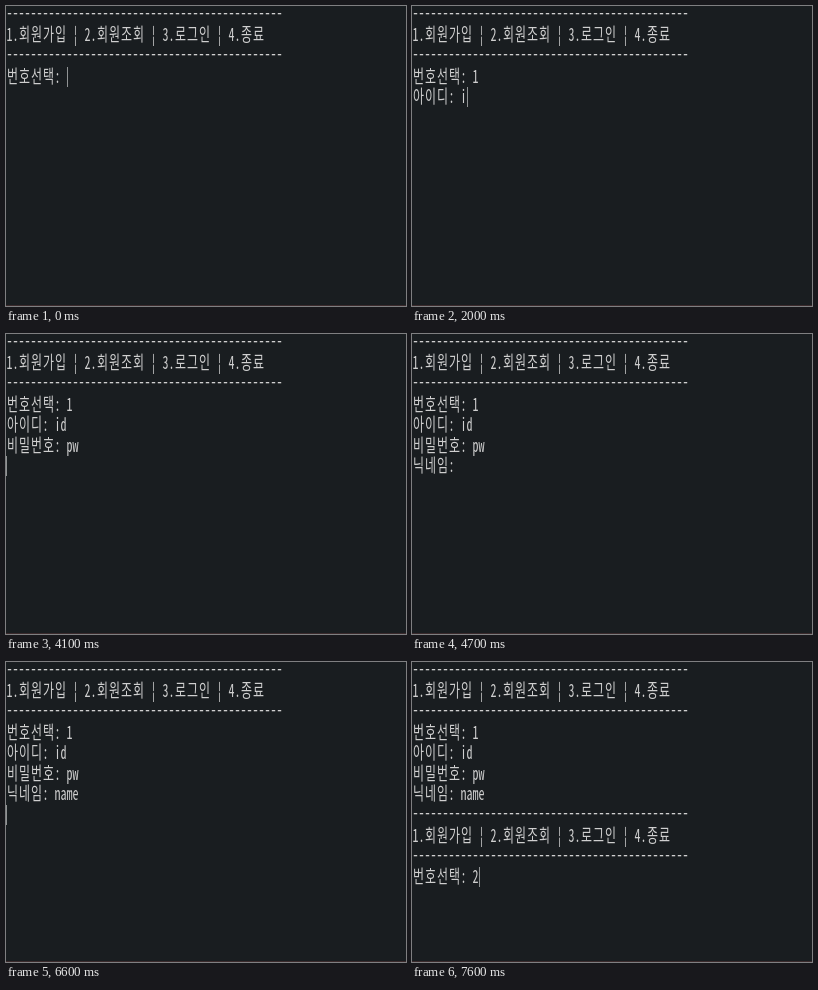
Write an HTML page with a canvas that moves like this. It is 400 by 300 pixels and loops after 8000 ms.

```html
<!DOCTYPE html>
<html lang="ko">
<head>
<meta charset="utf-8">
<style>
html, body { margin: 0; width: 100%; height: 100%; overflow: hidden; background: #191d20; }
canvas { display: block; }
</style>
</head>
<body>
<canvas id="stage" width="400" height="300"></canvas>
<script>
const ctx = document.getElementById('stage').getContext('2d');
const LOOP = 8000;
const CELL = 6, PITCH = 20.6, TOP = -1.3, BASE = 16;
const SIZE = 18, SQUEEZE = 2 * CELL / SIZE;
const FONT = SIZE + 'px "Noto Sans Mono CJK KR", "Noto Sans CJK KR", "Noto Sans CJK", "Noto Sans Mono", monospace';

const RULE = '-'.repeat(46);
const MENU = [RULE, '1.회원가입 ¦ 2.회원조회 ¦ 3.로그인 ¦ 4.종료', RULE, '번호선택: '].join('\n');

// [time, text appended, caret row, caret column]; without a row the caret is hidden
const steps = [
  [0, MENU, 3, 10],
  [100, ''],
  [500, '1', 3, 11],
  [800, '\n', 4, 0],
  [900, '아이디: ', 4, 0],
  [1400, ''],
  [2000, 'i', 4, 9],
  [2100, 'd', 4, 10],
  [2600, '\n', 5, 0],
  [2700, '비밀번호: ', 5, 0],
  [3200, ''],
  [3500, 'p', 5, 11],
  [3600, 'w', 5, 12],
  [4100, '\n', 6, 0],
  [4200, '닉네임: ', 6, 0],
  [4700, ''],
  [5300, '', 6, 0],
  [5400, 'n', 6, 9],
  [5500, 'a', 6, 10],
  [5800, 'm', 6, 11],
  [6000, 'e', 6, 12],
  [6500, ''],
  [6600, '\n', 7, 0],
  [6700, MENU, 7, 0],
  [7100, ''],
  [7600, '2', 10, 11]
];

const rowTop = row => TOP + row * PITCH;
const isWide = ch => ch >= '가' && ch <= '힣';

function drawLine(line, row) {
  let col = 0;
  for (const ch of line) {
    const span = isWide(ch) ? 2 : 1;
    const x = 0.6 + (col + span / 2) * CELL;
    const lift = ch === '-' ? 1.5 : 0;
    ctx.fillText(ch, x / SQUEEZE, rowTop(row) + BASE - lift);
    col += span;
  }
}

function draw(t) {
  const done = steps.filter(s => s[0] <= t);
  const [, , row, col] = done[done.length - 1];

  ctx.fillStyle = '#191d20';
  ctx.fillRect(0, 0, 400, 300);
  ctx.fillStyle = '#3a2a2c';
  ctx.fillRect(0, 299, 400, 1);

  ctx.save();
  ctx.scale(SQUEEZE, 1);
  ctx.font = FONT;
  ctx.textAlign = 'center';
  ctx.fillStyle = '#cfcfcf';
  done.map(s => s[1]).join('').split('\n').forEach(drawLine);
  ctx.restore();

  if (row !== undefined) {
    ctx.fillStyle = '#909394';
    ctx.fillRect(col ? col * CELL + 1 : 0, Math.round(rowTop(row)), 1, 20);
  }
}

function tick(now) {
  draw(now % LOOP);
  requestAnimationFrame(tick);
}
draw(0);
requestAnimationFrame(tick);
</script>
</body>
</html>
```
